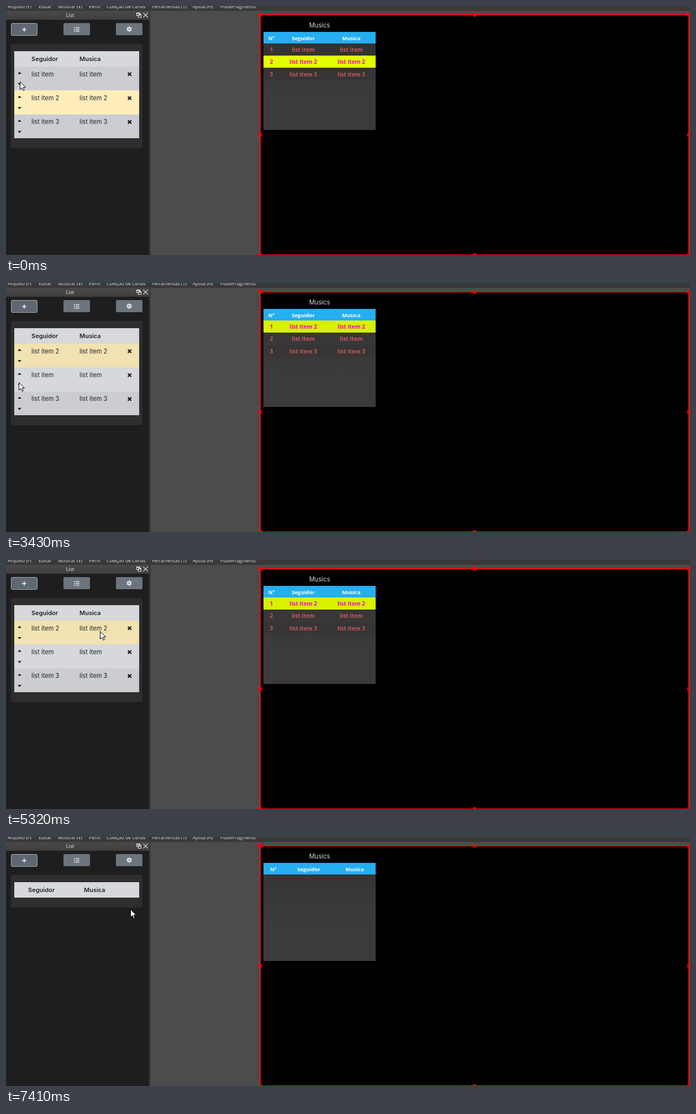
Recreate the animation shown at these times as an HTML page with a canvas. Size 1238 by 452 pixels, loop 7.59 s.

```html
<!DOCTYPE html>
<html lang="pt">
<head>
<meta charset="utf-8">
<style>
  html, body { margin: 0; width: 100%; height: 100%; overflow: hidden; background: #1e1e1e; }
  canvas { display: block; }
</style>
</head>
<body>
<canvas id="stage" width="1238" height="452"></canvas>
<script>
const ctx = document.getElementById('stage').getContext('2d');
const LOOP = 7590;
const UI = 'Inter, sans-serif';
const TABLE = '"Open Sans", sans-serif';
const INK = '#212529';

// [time, item order from top to bottom]
const orders = [
  [0, [1, 2, 3]], [220, [2, 1, 3]], [1710, [2, 3, 1]], [2860, [2, 1, 3]],
  [3890, [1, 2, 3]], [4990, [2, 1, 3]], [5650, [1, 3]], [6490, [3]], [7410, []]
];

// [first step, last step, number of steps, x, y]
const moves = [
  [780, 1400, 9, 24, 184], [1630, 1710, 2, 24, 186], [2260, 2490, 4, 27, 211],
  [2640, 2710, 2, 24, 210], [3180, 3580, 6, 22, 170], [4440, 4830, 6, 26, 139],
  [5070, 5480, 6, 221, 125], [6030, 6340, 5, 225, 124], [7030, 7030, 1, 225, 131]
];

// [press, release]
const clicks = [
  [140, 220], [1630, 1710], [2790, 2860], [3750, 3820],
  [4910, 4990], [5560, 5650], [6410, 6490], [7270, 7340]
];

const menu = [
  ['Arquivo (F)', 3], ['Editar', 59], ['Mostrar (V)', 94], ['Perfil', 150],
  ['Coleção de Cenas', 182], ['Ferramentas (T)', 264], ['Ajuda (H)', 338], ['PulseFragments', 388]
];

function rect(x, y, w, h, fill) {
  ctx.fillStyle = fill;
  ctx.fillRect(x, y, w, h);
}

function roundRect(x, y, w, h, r, fill, stroke) {
  ctx.beginPath();
  ctx.roundRect(x, y, w, h, r);
  ctx.fillStyle = fill;
  ctx.fill();
  if (stroke) {
    ctx.strokeStyle = stroke;
    ctx.lineWidth = 1;
    ctx.stroke();
  }
}

function polygon(points, fill) {
  ctx.beginPath();
  points.forEach(([x, y]) => ctx.lineTo(x, y));
  ctx.closePath();
  ctx.fillStyle = fill;
  ctx.fill();
}

function circle(x, y, r, fill) {
  ctx.beginPath();
  ctx.arc(x, y, r, 0, Math.PI * 2);
  ctx.fillStyle = fill;
  ctx.fill();
}

function cross(x, y, r, width, color) {
  ctx.beginPath();
  ctx.moveTo(x - r, y - r);
  ctx.lineTo(x + r, y + r);
  ctx.moveTo(x + r, y - r);
  ctx.lineTo(x - r, y + r);
  ctx.lineWidth = width;
  ctx.strokeStyle = color;
  ctx.stroke();
}

function text(str, x, y, font, fill, align = 'left') {
  ctx.font = font;
  ctx.fillStyle = fill;
  ctx.textAlign = align;
  ctx.fillText(str, x, y);
}

function vertical(y0, y1, from, to) {
  const g = ctx.createLinearGradient(0, y0, 0, y1);
  g.addColorStop(0, from);
  g.addColorStop(1, to);
  return g;
}

const label = item => item === 1 ? 'list item' : 'list item ' + item;

function drawWindow() {
  rect(0, 0, 1238, 452, '#4c4c4c');
  rect(0, 0, 1238, 9, '#3a393a');
  menu.forEach(([name, x]) => text(name, x, 4, '8.6px ' + TABLE, '#e4e4e4'));

  rect(0, 9, 259, 16, vertical(9, 25, '#4a4a4a', '#3e3e3e'));
  rect(0, 25, 259, 427, '#1f1e1f');
  rect(259, 9, 3, 443, '#3b3b3b');
  text('List', 116, 20, '9px ' + TABLE, '#f0f0f0', 'center');

  ctx.strokeStyle = '#e8e8e8';
  ctx.lineWidth = 1;
  ctx.strokeRect(236.5, 12.5, 6, 5);
  rect(239, 15, 7, 6, '#424242');
  ctx.strokeRect(239.5, 15.5, 5, 5);
  rect(236, 12, 7, 2, '#e8e8e8');
  rect(239, 15, 6, 2, '#e8e8e8');
  cross(252.5, 16.5, 4.2, 1.1, '#e8e8e8');
}

function drawButtons() {
  roundRect(9.5, 31.5, 47, 22, 2, '#5f6871', '#a4abb2');
  roundRect(104, 31, 48, 22, 2, '#6c757d');
  roundRect(199, 31, 48, 22, 2, '#6c757d');

  rect(29, 42, 8, 1.4, '#fff');
  rect(32.3, 38.7, 1.4, 8, '#fff');

  for (let y = 38.5; y < 47; y += 3.2) {
    rect(123.5, y, 1.6, 1.6, '#fff');
    rect(126.5, y + 0.2, 6.2, 1.2, '#fff');
  }

  ctx.save();
  ctx.translate(223, 42);
  for (let i = 0; i < 6; i++) {
    rect(-1.3, -4.6, 2.6, 3, '#e6e8ea');
    ctx.rotate(Math.PI / 3);
  }
  ctx.restore();
  circle(223, 42, 3.4, '#e6e8ea');
  circle(223, 42, 1.4, '#6c757d');
}

function drawEditor(items) {
  const pitch = 43.4;
  const rowTop = i => Math.round(110 + i * pitch);
  const bottom = rowTop(items.length);
  const empty = !items.length;

  roundRect(9, 69, 238, bottom + 18 - 69, 4, '#2e2e2e');
  rect(15, 82, 226, 28, '#d6d8db');
  text('Seguidor', empty ? 40 : 46, 100, '600 11px ' + UI, INK);
  text('Musica', empty ? 141 : 133, 100, '600 11px ' + UI, INK);

  items.forEach((item, i) => {
    const top = rowTop(i);
    const y = 110 + i * pitch;
    const odd = i % 2 === 0;
    const fill = item === 2
      ? (odd ? '#f2e2b1' : '#ffeeba')
      : (odd ? '#cbcdd0' : '#d6d8db');
    rect(15, top, 226, rowTop(i + 1) - top, fill);
    polygon([[21, y + 13.2], [24.5, y + 9.6], [28, y + 13.2]], '#16181b');
    polygon([[21, y + 30], [24.5, y + 33.6], [28, y + 30]], '#16181b');
    text(label(item), 46, y + 17.6, '11.1px ' + UI, INK);
    text(label(item), 133, y + 17.6, '11.1px ' + UI, INK);
    cross(223.7, y + 13.8, 3, 2.2, '#16181b');
  });
}

function drawPreview(items) {
  rect(460, 16, 777, 436, '#000');
  ctx.strokeStyle = '#f00';
  ctx.lineWidth = 2;
  ctx.strokeRect(460, 16, 776, 436);
  for (const x of [460, 848, 1236]) {
    for (const y of [16, 234, 452]) {
      if (x !== 848 || y !== 234) rect(x - 3, y - 3, 6, 6, '#f00');
    }
  }

  const empty = !items.length;
  const columns = empty ? [484, 548, 631] : [480.5, 538, 625];
  text('Musics', 567.5, 39, '11.2px ' + UI, '#d8d8d8', 'center');
  rect(466, 47, 203, 21, '#25aef0');
  rect(466, 68, 203, 157, vertical(68, 160, '#363435', '#3d3a3c'));
  ['Nº', 'Seguidor', 'Musica'].forEach((name, i) =>
    text(name, columns[i], 61.5, 'bold 9.5px ' + TABLE, '#fff', 'center'));

  items.forEach((item, i) => {
    const top = Math.round(68 + i * 22.4);
    const odd = i % 2 === 0;
    const marked = item === 2;
    if (marked) rect(466, top, 203, 22, odd ? '#d6f200' : '#e1ff00');
    else if (odd) rect(466, top, 203, 22, 'rgba(0,0,0,.05)');
    [i + 1, label(item), label(item)].forEach((cell, c) =>
      text(cell, columns[c], 83 + i * 22.4, 'bold 10.1px ' + TABLE, marked ? '#ff00c8' : '#c85b5b', 'center'));
  });
}

function cursorAt(t) {
  let x = 25, y = 137;
  for (const [start, end, steps, toX, toY] of moves) {
    if (t < start) break;
    const interval = (end - start) / Math.max(1, steps - 1);
    const done = t >= end ? 1 : (Math.floor((t - start) / interval) + 1) / steps;
    const ease = done * done * (3 - 2 * done);
    x += (toX - x) * ease;
    y += (toY - y) * ease;
  }
  return [Math.round(x), Math.round(y)];
}

function drawCursor(t) {
  const [x, y] = cursorAt(t);
  if (clicks.some(([press, release]) => t >= press && t < release)) {
    circle(x, y + 1, 9, 'rgba(226,219,45,.8)');
  }
  const shape = [[0, 0], [0, 14], [3.2, 11], [5.6, 16], [7.8, 15], [5.6, 10.2], [10, 10.2]];
  polygon(shape.map(([dx, dy]) => [x + 0.5 + dx, y + 0.5 + dy]), '#fff');
  ctx.strokeStyle = '#000';
  ctx.lineWidth = 1;
  ctx.stroke();
}

function draw(now) {
  const t = now % LOOP;
  const items = orders.filter(([start]) => t >= start).pop()[1];
  drawWindow();
  drawButtons();
  drawEditor(items);
  drawPreview(items);
  drawCursor(t);
}

let begin;
function tick(now) {
  begin ??= now;
  draw(Math.max(0, now - begin));
  requestAnimationFrame(tick);
}
draw(0);
requestAnimationFrame(tick);
</script>
</body>
</html>
```
